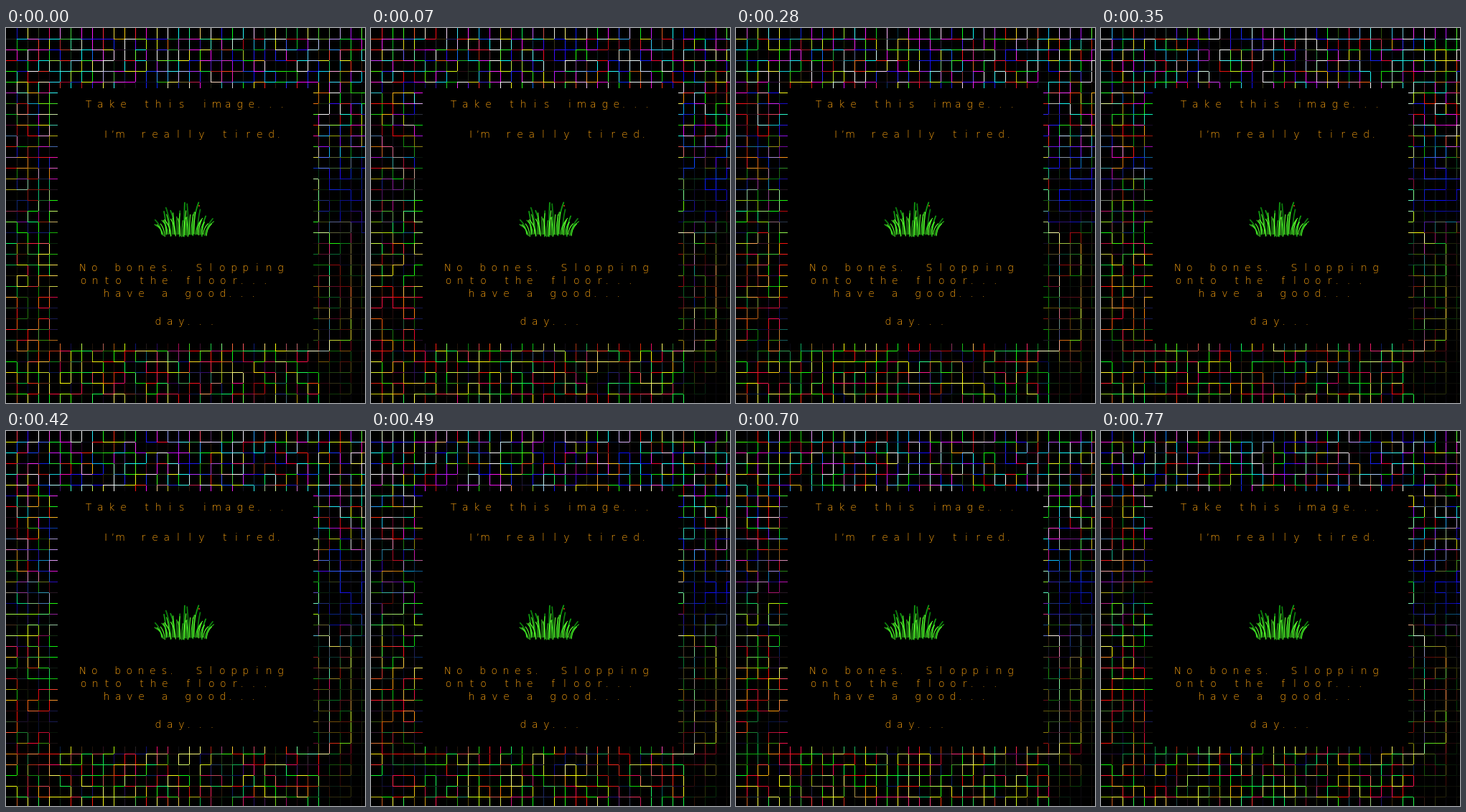
Write an HTML page with a canvas that moves like this. It is 500x523 px and loops after 840 ms.

```html
<!DOCTYPE html>
<html lang="en">
<head>
<meta charset="utf-8">
<title>Tired</title>
<style>
  html, body { margin: 0; width: 100%; height: 100%; overflow: hidden; background: #000; }
  canvas, svg { position: absolute; left: 0; top: 0; width: 500px; height: 523px; }
  text { font: 200 14px "DejaVu Sans", sans-serif; fill: #ffa510; text-anchor: middle; }
  path { fill: none; stroke-linecap: round; }
</style>
</head>
<body>
<canvas id="grid" width="500" height="523"></canvas>
<svg id="art" viewBox="0 0 500 523"></svg>
<script>
const STEP = 70, STEPS = 12, CELL = 15, COLS = 34, ROWS = 35;
const ctx = document.getElementById('grid').getContext('2d');
const art = document.getElementById('art');

function hash(a, b = 0, c = 0, d = 0) {
  let h = a * 374761393 ^ b * 668265263 ^ c * 1274126177 ^ d * 974634779;
  h = Math.imul(h ^ h >>> 15, 0x85ebca6b);
  h = Math.imul(h ^ h >>> 13, 0xc2b2ae35);
  return ((h ^ h >>> 16) >>> 0) / 4294967296;
}

function add(tag, attrs, text) {
  const el = document.createElementNS('http://www.w3.org/2000/svg', tag);
  for (const k in attrs) el.setAttribute(k, attrs[k]);
  if (text) el.textContent = text;
  art.appendChild(el);
}

// One line of evenly pitched letters, from the centre of the first
function line(text, x, y) {
  const xs = [];
  for (const ch of text) {
    xs.push(ch === '.' ? x - 6 : x);
    x += 'I’'.includes(ch) ? 10 : 16.2;
  }
  add('text', { x: xs.join(' '), y, 'xml:space': 'preserve' }, text);
}
line('Take this image...', 115, 111);
line('I’m really tired.', 139, 153);
line('No bones.  Slopping', 107, 339);
line('onto the floor...', 108, 357);
line('have a good...', 140, 375);
line('day...', 212, 414);

// Grass: blades fan out from a clump, tall dark ones behind
function blades(count, seed, height, width, colors) {
  for (let i = 0; i < count; i++) {
    const rnd = n => hash(i, n, seed);
    const t = i / (count - 1) * 2 - 1;
    const x = 248 + 31 * t, y = 291 - 4 * rnd(1);
    const tx = x + 9 * t + 10 * (rnd(2) - .5);
    const ty = y - height * (1 - .45 * t * t) * (.65 + .35 * rnd(3));
    const d = `M${x} ${y}Q${x + (tx - x) * .1} ${y + (ty - y) * .6} ${tx} ${ty}`;
    add('path', { d, stroke: colors[i % colors.length], 'stroke-width': width });
  }
}
blades(11, 1, 50, 1.8, ['#0c7c0c', '#109a10']);
blades(30, 2, 34, 1.1, ['#66ff33', '#33d91f', '#55f52b']);
add('circle', { cx: 269, cy: 248, r: 1, fill: '#d8401a' });

const bump = (v, at, width) => Math.exp(-(((v - at) / width) ** 2));

// Strength of red, green and blue around the frame
function tint(u, v) {
  const left = u < .16 ? 1 : 0, right = u > .84 ? 1 : 0;
  const shade = 1 - .85 * right * bump(v, .98, .2);
  const night = 1 - .93 * right * bump(v, .44, .13);
  return [
    (.85 - .4 * bump(v, .45, .1)) * shade * night,
    (.85 - .5 * left * bump(v, .78, .12) - .45 * left * bump(v, .35, .1)) * shade * night,
    (.12 + .8 * Math.max(0, 1 - 1.5 * v) + .9 * u * (1 - u) + .3 * right * bump(v, .4, .1)) * shade
  ];
}

// Lasting bright band at the lower right
function band(c, r) {
  const inner = c < 30 ? 1 : 0;
  if (c < 27 || c > 31 || r < 20 - inner || r > 28 + inner) return 0;
  return inner ? .75 : .4;
}

function cellColor(c, r, step) {
  const seed = hash(c, r, 7, 3) < .3 ? 99 : step + 1;
  const glow = band(c, r);
  const beside = c > 31 && r > 18 ? .2 : 1;
  return tint((c + .5) / COLS, (r + .5) / ROWS).map((amp, i) => {
    const ch = hash(c, r, seed, 20 + i) < .45 ? 0 : i + 1;
    const on = hash(c, r, seed, 30 + ch) < .45 ? .55 + .45 * hash(c, r, seed, 40 + ch) : 0;
    const base = glow * (i < 2 ? 1 : glow - .15);
    return base + (glow ? .45 : beside) * amp * (on + .2 * hash(c, r, seed, 50 + i));
  });
}

function drawGrid(step) {
  const cells = [];
  for (let r = 0; r < ROWS; r++)
    for (let c = 0; c < COLS; c++) cells.push(cellColor(c, r, step));
  const edge = (a, b, x, y, w, h) => {
    const rgb = a.map((v, i) => Math.round(Math.min(1, Math.abs(v - b[i]) * 1.45 + .03) * 250));
    ctx.fillStyle = `rgb(${rgb})`;
    ctx.fillRect(x, y, w, h);
  };
  ctx.fillStyle = '#000';
  ctx.fillRect(0, 0, 500, 523);
  for (let r = 0; r < ROWS; r++) {
    for (let c = 0; c < COLS; c++) {
      const k = r * COLS + c, x = c * CELL, y = r * CELL;
      if (c) edge(cells[k], cells[k - 1], x, y, 1, CELL);
      if (r) edge(cells[k], cells[k - COLS], x, y, CELL, 1);
    }
  }
  ctx.fillStyle = '#000';
  ctx.fillRect(72, 84, 356, 356);
}

let shown = -1;
function tick() {
  const step = Math.floor(performance.now() / STEP) % STEPS;
  if (step !== shown) drawGrid(shown = step);
  requestAnimationFrame(tick);
}
tick();
</script>
</body>
</html>
```
